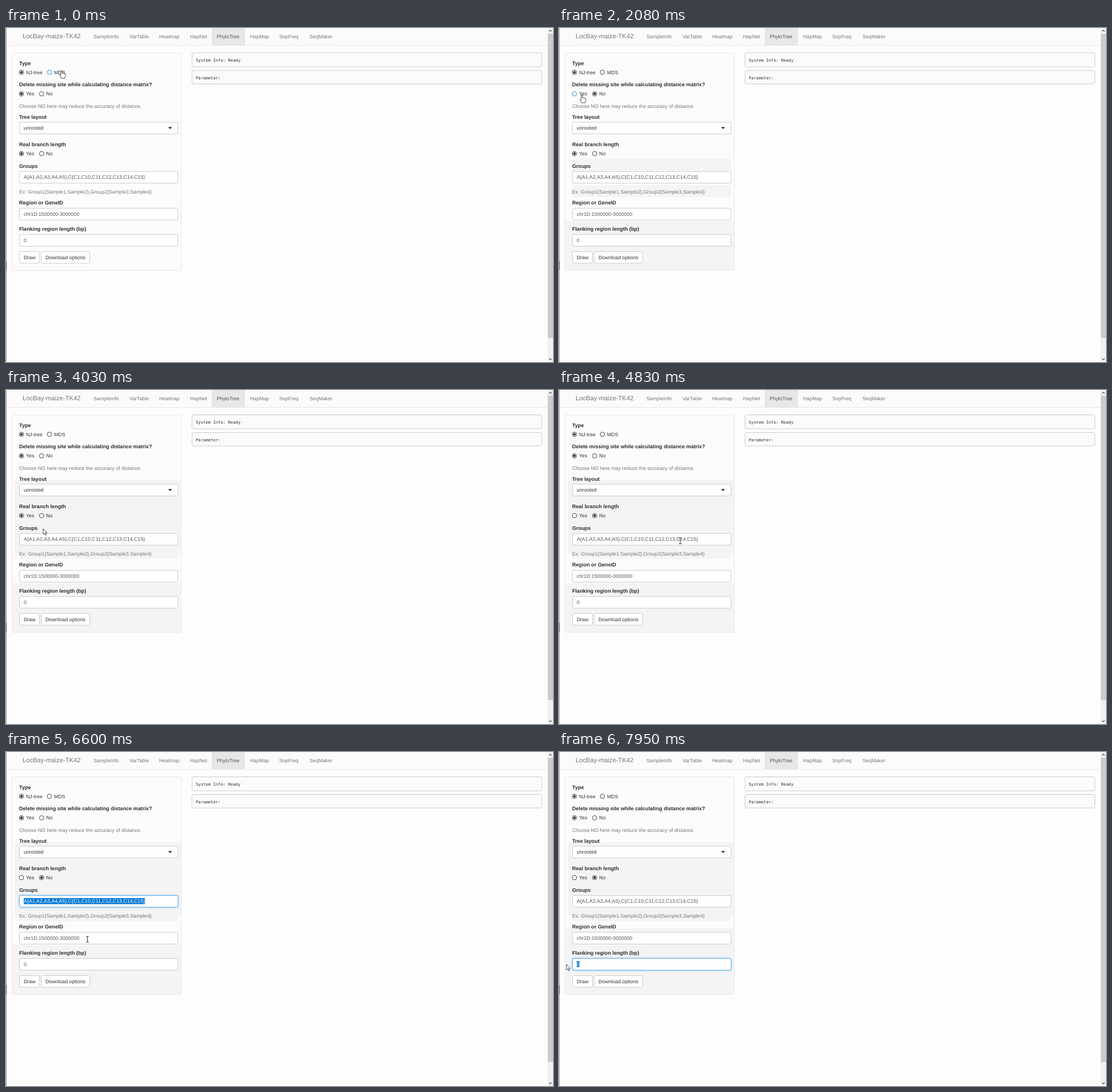
Write an HTML page that moves like this. It is 957 by 585 pixels and loops after 8000 ms.

```html
<!DOCTYPE html>
<html lang="en">
<head>
<meta charset="utf-8">
<title>Phylogenetic tree form</title>
<style>
  html, body { margin: 0; width: 100%; height: 100%; overflow: hidden; background: #fdfdfd; }
  svg { display: block; width: 957px; height: 585px; }
  text { font: 8.8px "Liberation Sans", Arial, sans-serif; fill: #333; text-rendering: geometricPrecision; white-space: pre; }
  .brand { font-size: 11.2px; fill: #777; }
  .nav { fill: #777; }
  .current { fill: #555; }
  .label { font-size: 9.1px; font-weight: bold; fill: #2b2b2b; }
  .help { fill: #777; }
  .value { fill: #555; }
  .mono { font: 7.22px "DejaVu Sans Mono", monospace; }
  .box { fill: #fff; stroke: #ccc; }
  .pre { fill: #fbfbfb; stroke: #ccc; }
  .focus { stroke: #66afe9; filter: drop-shadow(0 0 1.8px rgba(102, 175, 233, .8)); }
  .shade { fill: #f4f4f4; }
  .radio circle:first-child { fill: #fff; stroke: #444; }
  .radio circle:last-child { fill: #222; display: none; }
  .radio.on circle:last-child { display: inline; }
  .radio.hover circle:first-child { stroke: #2b8fdc; }
  .radio.hover circle:last-child { fill: #0078d7; }
  .mark { fill: #0078d7; }
  .picked { fill: #fff; }
  .pointer { fill: #fff; stroke: #222; stroke-width: .8; stroke-linejoin: round; }
</style>
</head>
<body>
<svg id="stage" viewBox="0 0 957 585"></svg>
<script>
const LOOP = 8000;
const stage = document.getElementById('stage');
const $ = id => document.getElementById(id);

const text = (x, midY, str, cls = '', id = '') =>
  `<text x="${x}" y="${midY + 3.1}" class="${cls}"${id && ` id="${id}"`}>${str}</text>`;
const rect = (x, y, w, h, attrs = '') =>
  `<rect x="${x}" y="${y}" width="${w}" height="${h}" ${attrs}/>`;
const shade = (id, x, y, w, h) => rect(x, y, w, h, `id="${id}" class="shade" rx="2"`);
const box = (x, y, w, h, cls = 'box', id = '') =>
  rect(x, y, w, h, `rx="2.5" class="${cls}"${id && ` id="${id}"`}`);
const radio = (id, x, y, name) =>
  `<g id="${id}" class="radio"><circle cx="${x}" cy="${y}" r="3.9"/><circle cx="${x}" cy="${y}" r="2.2"/></g>` +
  text(x + 8, y, name);
const field = (id, midY, value) =>
  box(23.5, midY - 10, 277.5, 20.5, 'box', id + 'Box') +
  text(31, midY, value, 'value', id + 'Text') +
  `<clipPath id="${id}Clip">${rect(0, midY - 5.2, 0, 10.4, `id="${id}ClipRect"`)}</clipPath>
   <g clip-path="url(#${id}Clip)">${rect(23, midY - 6, 278, 12, 'class="mark"')}${text(31, midY, value, 'picked')}</g>`;
const button = (x, w, name) => box(x, 391.5, w, 20.5) + text(x + 7.5, 402, name);

const tabs = [[153, 'SampleInfo'], [216, 'VarTable'], [268, 'Heatmap'], [322, 'HapNet'],
  [368.7, 'PhyloTree'], [427, 'HapMap'], [478, 'SnpFreq'], [531, 'SeqMaker']];
const layouts = ['phylogram', 'cladogram', 'fan', 'unrooted', 'radial'];
const optionTop = i => 190 + i * 16.6;

stage.innerHTML = `
  ${rect(0, 0, 957, 585, 'fill="#fdfdfd"')}
  ${rect(0, 0, 948, 30, 'fill="#fbfbfb"')}
  ${rect(360, 0, 58, 30, 'fill="#e7e7e7"')}
  ${rect(0, 30, 948, 1, 'fill="#e7e7e7"')}
  ${rect(0, 0, 1.2, 585, 'fill="#b0b0b0"')}
  ${rect(0, 408, 1.2, 16, 'fill="#666"')}
  ${text(29, 14.4, 'LocBay-maize-TK42', 'brand')}
  ${tabs.map(([x, name]) => text(x, 14.5, name, name === 'PhyloTree' ? 'current' : 'nav')).join('')}
  ${rect(947.5, 0, 9.5, 585, 'fill="#f1f1f1"')}
  ${rect(948, 10, 9, 533, 'fill="#cbcbcb"')}
  <path d="M950 6.2l2.4-2.4 2.4 2.4M950 578.8l2.4 2.4 2.4-2.4" fill="none" stroke="#505050" stroke-width="1.2"/>
  ${box(325.5, 43.5, 612, 24.5, 'pre')}${text(332, 55.6, 'System Info: Ready', 'mono')}
  ${box(325.5, 74.5, 612, 23.5, 'pre')}${text(332, 86.6, 'Parameter:', 'mono')}

  ${rect(11, 339, 296, 85, 'id="vacated" fill="#fff"')}
  ${rect(10.5, 43.5, 296, 381, 'id="well" rx="2" fill="#fcfcfc" stroke="#e9e9e9"')}
  ${shade('shadeHint', 23, 250, 278, 22)}
  ${shade('shadeFoot', 23, 315, 278, 21)}
  ${shade('shadeLabel', 23, 229, 278, 22)}
  ${shade('shadeHelp', 23, 275, 278, 21)}
  ${shade('shadeBottom', 11, 338, 295, 86)}
  ${shade('shadeMiddle', 15, 158, 291, 128)}
  ${shade('shadeRegion', 12, 309, 294, 30)}

  ${text(23, 62, 'Type', 'label')}
  ${radio('nj', 27, 77.6, 'NJ-tree')}${radio('mds', 76, 77.6, 'MDS')}
  ${text(23, 99, 'Delete missing site while calculating distance matrix?', 'label')}
  ${radio('delYes', 27, 115.3, 'Yes')}${radio('delNo', 62.3, 115.3, 'No')}
  ${text(23, 137, 'Choose NO here may reduce the accuracy of distance.', 'help')}

  <g id="treeOnly">
    ${text(23, 155.5, 'Tree layout', 'label')}
    ${box(23.5, 165, 277.5, 20.5, 'box', 'layoutBox')}
    ${text(31, 175.3, 'unrooted')}
    <path id="caret" d="M283.8 173.4h6.6l-3.3 3.5z" fill="#222"/>
    ${text(23, 204, 'Real branch length', 'label')}
    ${radio('realYes', 27, 220, 'Yes')}${radio('realNo', 62.3, 220, 'No')}
  </g>

  <g id="lower">
    ${text(23, 241.5, 'Groups', 'label')}
    ${field('groups', 261.3, 'A{A1,A2,A3,A4,A5},C{C1,C10,C11,C12,C13,C14,C15}')}
    ${text(23, 287.3, 'Ex: Group1{Sample1,Sample2},Group2{Sample3,Sample4}', 'help')}
    ${text(23, 306, 'Region or GeneID', 'label')}
    ${field('region', 325.8, 'chr1D:1500000-3000000')}
    ${text(23, 352, 'Flanking region length (bp)', 'label')}
    ${field('flank', 371.6, '0')}
    ${button(23.5, 35, 'Draw')}${button(61.5, 85, 'Download options')}
  </g>

  <g id="menu">
    ${box(23.5, 186.5, 277.5, 91)}
    ${rect(24, 0, 276.5, 16.6, 'id="active" fill="#f0f0f0"')}
    ${layouts.map((name, i) => text(31, optionTop(i) + 8.3, name)).join('')}
  </g>

  <g id="cursor">
    <circle id="press" r="7" fill="#f2e234" opacity=".9"/>
    <path id="hand" class="pointer" d="M-1.1 1Q0-.8 1.1 1V5.3Q2.2 4.5 3 5.6Q4.2 4.9 5 6.1Q6.6 5.6 6.8 7.2V10.3Q6.6 12 5.7 12.7V14H-.4Q-1.4 10.8-3.3 8.7Q-2.9 6.9-1.1 8.4Z"/>
    <path id="arrow" class="pointer" d="M0 0V9.9L2.3 7.8 3.9 11.3 5.4 10.6 3.9 7.2H7Z"/>
    <path id="beam" d="M-2.5-5h5M0-5V5M-2.5 5h5" fill="none" stroke="#222" stroke-width=".9"/>
  </g>`;

// Cursor stops: time, x, y
const path = [
  [0, 97, 74], [430, 97, 74], [830, 51, 75], [1190, 51, 75], [1470, 75, 116],
  [1760, 75, 116], [2060, 40, 117], [2370, 40, 117], [2630, 64, 179], [2960, 64, 179],
  [3200, 72, 200], [3600, 65, 243], [4040, 65, 243], [4220, 64, 217], [4500, 64, 217],
  [4900, 243, 274], [5130, 254, 262], [5210, 254, 262], [5510, 152.5, 258], [5900, 6, 258],
  [6060, 6, 258], [6560, 142.5, 328], [6730, 142.5, 328], [6850, 88, 327], [7000, 18, 326],
  [7120, 18, 326], [7500, 45, 371], [7710, 45, 371], [7900, 13, 372], [LOOP, 13, 372]
];
const shapes = [
  [0, 'hand'], [460, 'arrow'], [770, 'hand'], [1230, 'arrow'], [1400, 'hand'], [1790, 'arrow'],
  [2000, 'hand'], [2400, 'arrow'], [2570, 'hand'], [3850, 'arrow'], [4150, 'hand'], [4530, 'arrow'],
  [4780, 'beam'], [5880, 'arrow'], [6420, 'beam'], [6980, 'arrow'], [7360, 'beam'], [7830, 'arrow']
];
const presses = [[360, 470], [980, 1090], [1660, 1760], [2270, 2370], [2880, 2980],
  [3730, 3830], [4400, 4500], [5210, 5960], [6740, 7050], [7710, 7930]];
const hovers = { mds: [0, 470], nj: [780, 1220], delNo: [1410, 1800], delYes: [2010, 2390], realNo: [4160, 4540] };
// Focused span of each field and the end of its drag
const drags = { groups: [5230, 6770, 5900], region: [6770, 7740, 7000], flank: [7740, LOOP, 7900] };

const within = (t, [from, to]) => t >= from && t < to;
const show = (id, on) => $(id).style.display = on ? 'inline' : 'none';

function cursorAt(t) {
  const i = Math.max(1, path.findIndex(p => p[0] > t));
  const [a, b] = [path[i - 1], path[i]];
  const k = (t - a[0]) / (b[0] - a[0]);
  return [a[1] + (b[1] - a[1]) * k, a[2] + (b[2] - a[2]) * k];
}

// Marks whole characters from the dragged edge to the end of the value.
function select(id, t) {
  const [from, to, dragEnd] = drags[id];
  const focused = within(t, [from, to]);
  const label = $(id + 'Text');
  const end = 31 + label.getComputedTextLength();
  let start = end;
  if (focused) {
    const [x] = cursorAt(Math.min(t - 100, dragEnd));
    for (let i = label.getNumberOfChars() - 1; i >= 0; i--) {
      const { x: left, width } = label.getExtentOfChar(i);
      if (x > left + width / 2) break;
      start = left;
    }
  }
  $(id + 'Box').classList.toggle('focus', focused);
  $(id + 'ClipRect').setAttribute('x', start);
  $(id + 'ClipRect').setAttribute('width', Math.max(0, end - start));
}

function draw(t) {
  const [x, y] = cursorAt(t);
  const short = within(t, [540, 1100]);
  const open = within(t, [2950, 3800]);
  const redrawn = t >= 1100;

  const mds = within(t, [430, 1050]);
  const keep = within(t, [1720, 2330]);
  const equal = t >= 4460;
  const checked = { nj: !mds, mds, delYes: !keep, delNo: keep, realYes: !equal, realNo: equal };
  for (const id in checked) {
    $(id).classList.toggle('on', checked[id]);
    $(id).classList.toggle('hover', id in hovers && within(t, hovers[id]));
  }

  show('treeOnly', !short);
  $('lower').setAttribute('transform', `translate(0 ${short ? -86 : 0})`);
  $('well').setAttribute('height', short ? 295 : 381);
  show('vacated', short);
  show('shadeHint', short);
  show('shadeFoot', short);
  show('shadeLabel', redrawn);
  show('shadeHelp', redrawn);
  show('shadeBottom', redrawn);
  show('shadeMiddle', t >= 2950);
  show('shadeRegion', t >= 6770);

  show('menu', open);
  $('layoutBox').classList.toggle('focus', within(t, [2950, 3860]));
  $('caret').setAttribute('transform', open ? 'rotate(180 287.1 175.2)' : '');
  const hot = y < 190 ? 3 : Math.min(4, Math.floor((y - 190) / 16.6));
  $('active').setAttribute('y', optionTop(hot));

  Object.keys(drags).forEach(id => select(id, t));

  $('cursor').setAttribute('transform', `translate(${x} ${y})`);
  const shape = shapes.filter(s => s[0] <= t).pop()[1];
  ['hand', 'arrow', 'beam'].forEach(id => show(id, id === shape));
  show('press', presses.some(p => within(t, p)));
}

function tick() {
  draw(performance.now() % LOOP);
  requestAnimationFrame(tick);
}
tick();
</script>
</body>
</html>
```
